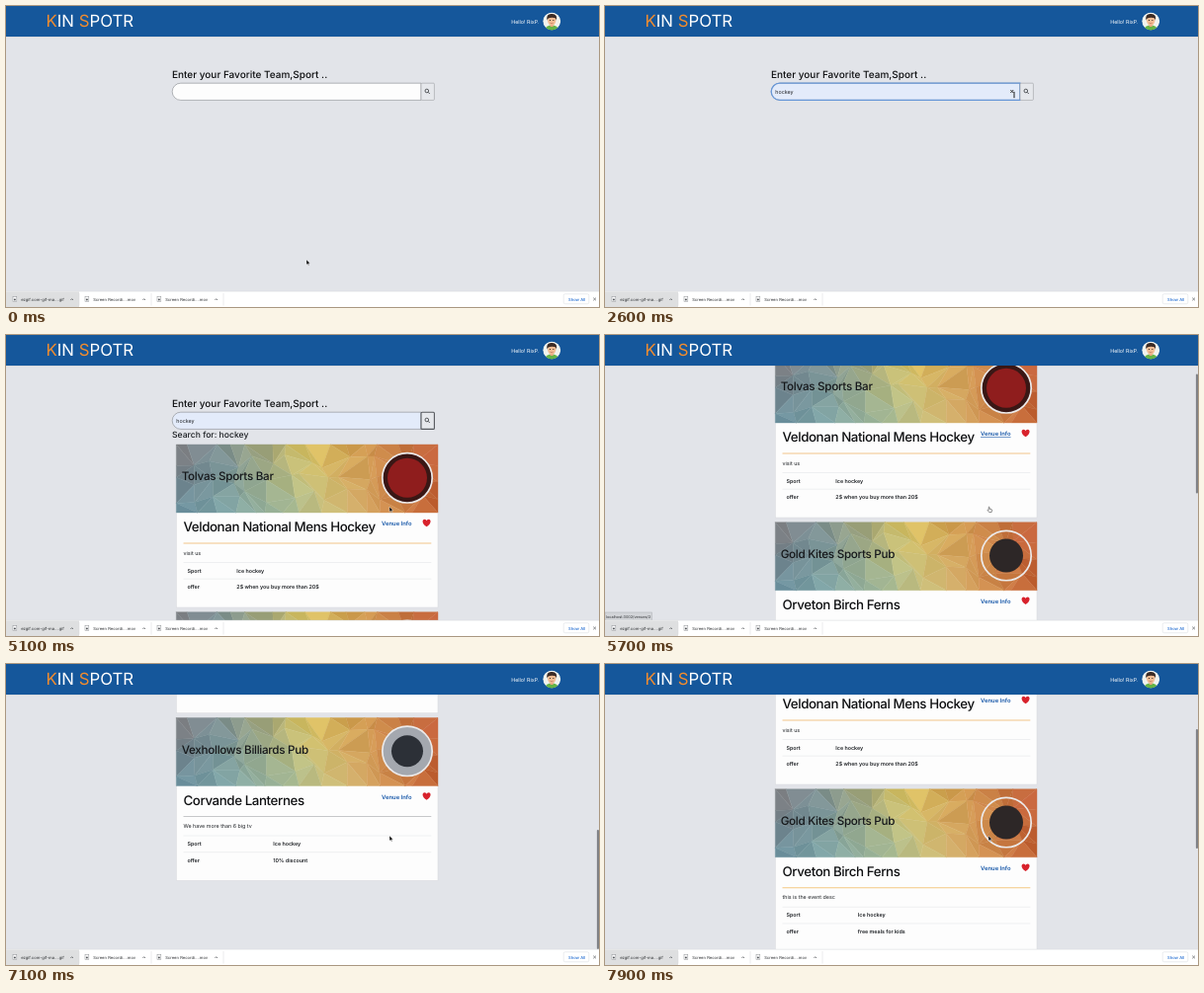
An HTML page that plays this animation: 600x305 px, repeating every 8 s.

```html
<!DOCTYPE html>
<html lang="en">
<head>
<meta charset="utf-8">
<title>Sports venue search</title>
<style>
  html, body { margin: 0; width: 100%; height: 100%; overflow: hidden; background: #e2e4e9; }
  svg { display: block; width: 600px; height: 305px; }
  text { font-family: Inter, "Open Sans", sans-serif; font-size: 5.35px; fill: #1d2024; text-rendering: geometricPrecision; white-space: pre; }
  .brand { font-size: 16.8px; font-weight: 400; fill: #fff; }
  .brand tspan { fill: #f28c2e; }
  .title { font-size: 10px; font-weight: 500; fill: #0e0f11; }
  .venue { font-size: 11.67px; font-weight: 500; letter-spacing: -.025em; fill: #15171a; }
  .event { font-size: 13.33px; font-weight: 500; letter-spacing: -.031em; fill: #0e0f11; }
  .bold { font-weight: 600; }
  .link { font-size: 5.9px; font-weight: 600; fill: #1556a8; }
  .tiny { font-size: 4.15px; fill: #2c2f32; }
</style>
</head>
<body>
<script>
const LOOP = 8000, STEP = 100;
const STAGE_H = 289, PAGE_H = 685;

// Each row: time, then values to blend between.
const SCROLL = [
  [5100, 0], [5300, 18], [5700, 91], [6300, 248], [6800, 385],
  [6950, 396], [7200, 396], [7400, 350], [7900, 154]
];
const POINTER = [
  [0, 304, 257], [200, 304, 255], [600, 318, 170], [900, 326, 100], [1200, 310, 88],
  [1600, 300, 90], [1800, 298, 96], [2000, 280, 103], [2200, 290, 102], [2500, 414, 90],
  [2600, 414, 90], [2900, 427, 87], [3600, 427, 87], [4000, 412, 120], [4400, 388, 174]
];
// Each row: start time, pointer shape.
const SHAPES = [
  [0, 'arrow'], [1000, 'beam'], [1800, 'arrow'], [2400, 'beam'],
  [2700, 'arrow'], [5300, 'hand'], [5800, 'arrow']
];

const CARDS = [
  { venue: 'Tolvas Sports Bar', event: 'Veldonan National Mens Hockey', desc: 'visit us',
    offer: '2$ when you buy more than 20$', col: 61, rule: '#efb56a', back: '#3a1715', mark: '#8f1d1d', size: 20 },
  { venue: 'Gold Kites Sports Pub', event: 'Orveton Birch Ferns', desc: 'this is the event desc',
    offer: 'free meals for kids', col: 83.5, rule: '#f2ba62', back: 'none', mark: '#2d2727', size: 17 },
  { venue: 'Vexhollows Billiards Pub', event: 'Corvande Lanternes', desc: 'We have more than 6 big tv',
    offer: '10% discount', col: 98, rule: '#b9babd', back: '#a4a8af', mark: '#2c3037', size: 16 }
];

function text(x, y, str, cls = '', extra = '') {
  return `<text x="${x}" y="${y}" class="${cls}" ${extra}>${str}</text>`;
}
function rect(x, y, w, h, fill, extra = '') {
  return `<rect x="${x}" y="${y}" width="${w}" height="${h}" fill="${fill}" ${extra}/>`;
}
function line(x1, y1, x2, y2, stroke, w = .5) {
  return `<path d="M${x1} ${y1}L${x2} ${y2}" stroke="${stroke}" stroke-width="${w}"/>`;
}

function blend(keys, t) {
  if (t <= keys[0][0]) return keys[0].slice(1);
  for (let i = 1; i < keys.length; i++) {
    const a = keys[i - 1], b = keys[i];
    if (t <= b[0]) {
      const k = (t - a[0]) / (b[0] - a[0]);
      return a.slice(1).map((v, j) => v + (b[j + 1] - v) * k);
    }
  }
  return keys[keys.length - 1].slice(1);
}

function random(seed) {
  return () => (seed = (seed * 16807) % 2147483647) / 2147483647;
}

// Colour rows: position, red, green, blue.
const TOP = [[0, 126, 118, 120], [.15, 116, 136, 144], [.35, 166, 168, 122], [.5, 220, 194, 94], [.75, 204, 144, 74], [1, 190, 88, 52]];
const LOW = [[0, 102, 140, 156], [.2, 126, 164, 164], [.45, 174, 194, 156], [.58, 202, 190, 122], [.78, 208, 148, 82], [1, 196, 98, 52]];

function banner(w, h) {
  const rnd = random(4217), cols = 14, rows = 4, pts = [];
  for (let r = 0; r <= rows; r++) {
    for (let c = 0; c <= cols; c++) {
      const jx = c % cols ? rnd() - .5 : 0, jy = r % rows ? rnd() - .5 : 0;
      pts.push([(c + jx * .9) * w / cols, (r + jy * .9) * h / rows]);
    }
  }
  const tri = ids => {
    const p = ids.map(i => pts[i]);
    const x = (p[0][0] + p[1][0] + p[2][0]) / 3 / w, y = (p[0][1] + p[1][1] + p[2][1]) / 3 / h;
    const a = blend(TOP, x), b = blend(LOW, x), shade = (rnd() - .5) * 20;
    const rgb = a.map((v, i) => Math.round(v + (b[i] - v) * y + shade));
    const fill = `rgb(${rgb})`;
    return `<path d="M${p.map(q => q.map(v => v.toFixed(1))).join('L')}Z" fill="${fill}" stroke="${fill}" stroke-width=".4"/>`;
  };
  let out = '';
  for (let r = 0; r < rows; r++) {
    for (let c = 0; c < cols; c++) {
      const a = r * (cols + 1) + c, b = a + 1, d = a + cols + 1, e = d + 1;
      out += rnd() < .5 ? tri([a, b, d]) + tri([b, e, d]) : tri([a, b, e]) + tri([a, e, d]);
    }
  }
  return out;
}

function card(c, i) {
  const y = 111 + i * 169.75;
  return `<g transform="translate(172.3 ${y})">
    ${rect(0, 0, 264.7, 165, '#fdfdfd', 'stroke="#d6d8dc" stroke-width=".5"')}
    <use href="#banner"/>
    ${text(5.4, 36.2, c.venue, 'venue')}
    <circle cx="233.7" cy="33.8" r="25.2" fill="${c.back}" stroke="#eceaea" stroke-width="1.7"/>
    <circle cx="233.7" cy="33.8" r="${c.size}" fill="${c.mark}"/>
    ${text(7.2, 88.4, c.event, 'event')}
    ${text(207.7, 82.2, 'Venue Info', 'link', i ? '' : 'id="link"')}
    <path transform="translate(253.3 79.3)" d="M0 4C-5.5 .4-4.4-3.6-2.2-3.6C-.9-3.6-.2-2.8 0-2.1C.2-2.8 .9-3.6 2.2-3.6C4.4-3.6 5.5 .4 0 4Z" fill="#d8222c"/>
    ${line(7.2, 100, 258, 100, c.rule, .8)}
    ${text(7.2, 111.6, c.desc)}
    ${line(7.2, 119.5, 258, 119.5, '#dfe1e4')}
    ${text(11.2, 129.5, 'Sport', 'bold')}${text(c.col, 129.5, 'Ice hockey', 'bold')}
    ${line(7.2, 136.2, 258, 136.2, '#dfe1e4')}
    ${text(11.2, 146.1, 'offer', 'bold')}${text(c.col, 146.1, c.offer, 'bold')}
  </g>`;
}

const FIELD = 'M176.8 78.2H420V95.4H176.8A8.6 8.6 0 0 1 176.8 78.2Z';

function searchForm() {
  return text(168, 72.8, 'Enter your Favorite Team,Sport ..', 'title') +
    `<path id="field" d="${FIELD}" stroke="#85888d" stroke-width=".6"/>
    <path id="ring" d="${FIELD}" fill="none" stroke="#6797d8" stroke-width="1.3"/>` +
    text(172.3, 88.6, 'hockey', '', 'id="value"') +
    `<path id="clear" d="M410.3 85L413.3 88M413.3 85L410.3 88" stroke="#222" stroke-width=".9"/>
    ${rect(420, 78.2, 13.4, 17.2, '#e6e8ec', 'id="button" rx="1"')}
    <g fill="none" stroke="#33363a" stroke-width=".8"><circle cx="425.8" cy="86" r="1.8"/><path d="M427.1 87.3L428.8 89"/></g>`;
}

function menu() {
  const rows = ['hockey', 'soccer', 'tennis', 'basketball'];
  return `<g id="menu">${rect(169, 97, 251, 72, '#fff', 'rx="2" stroke="#c9ccd1" stroke-width=".5"')}
    ${rect(169, 99, 251, 16, '#e9eaed', 'id="pick"')}
    ${rows.map((r, i) => text(174, 109 + i * 17, r)).join('')}</g>`;
}

function header() {
  return rect(0, 31, 600, 1, '#000', 'opacity=".05"') + rect(0, 0, 600, 31, '#15579b') +
    text(40.5, 21.2, '<tspan>K</tspan>IN <tspan>S</tspan>POTR', 'brand') +
    text(511.2, 17.6, 'Hello! RixP.', '', 'style="fill:#fff"') +
    `<g clip-path="url(#round)"><circle cx="552.2" cy="15.4" r="9" fill="#f1f3ee"/>
      <ellipse cx="552.2" cy="24" rx="6.8" ry="4.6" fill="#64b445"/>
      ${rect(550.7, 17, 3, 4, '#e5a77c')}
      <ellipse cx="552.2" cy="14.6" rx="4.2" ry="5" fill="#f2bd94"/>
      <path d="M547.4 14.5C546.4 7.6 551 8 552.6 8C557.4 8 557.6 12 556.9 14.5C556.5 12.4 555.3 11.7 552.3 11.8C549 11.8 548 12.6 547.4 14.5Z" fill="#3b2b25"/>
      <circle cx="550.5" cy="14.6" r=".5"/><circle cx="553.9" cy="14.6" r=".5"/>
      <path d="M550.7 17.2Q552.2 18.4 553.7 17.2" fill="none" stroke="#a2503f" stroke-width=".5"/></g>`;
}

function download(x, name) {
  return `${rect(x + 7, 294.6, 3.8, 5, '#fff', 'stroke="#8d9094" stroke-width=".5"')}
    <circle cx="${x + 8.9}" cy="297.4" r="1" fill="#55585c"/>
    ${text(x + 15.2, 298.9, name, 'tiny')}
    <path d="M${x + 65.4} 298L${x + 66.7} 296.7L${x + 68} 298" fill="none" stroke="#45484c" stroke-width=".7"/>
    ${line(x + 74, 291, x + 74, 303.5, '#d5d7da')}`;
}

function shelf() {
  return rect(0, 289, 600, 16, '#fff') + line(0, 289.2, 600, 289.2, '#d2d4d8') +
    rect(0, 289.4, 74, 15.6, '#dedfe0') +
    download(0, 'ezgif.com-gif-ma....gif') +
    download(73, 'Screen Recordi....mov') + download(146, 'Screen Recordi....mov') +
    rect(564.2, 291.8, 25.6, 10, '#fff', 'rx="1.5" stroke="#d5d8dc" stroke-width=".5"') +
    text(569, 298.6, 'Show All', 'tiny', 'style="fill:#1f6bd0;font-weight:500"') +
    '<path d="M594.2 295.6L597 298.4M597 295.6L594.2 298.4" stroke="#45484c" stroke-width=".6"/>';
}

function pointers() {
  return `<g id="pointer" stroke-linejoin="round">
    <path id="arrow" d="M0 0V5.2L1.2 4.1L2 5.8L2.9 5.4L2.1 3.8H3.7Z" fill="#000" stroke="#fff" stroke-width=".4"/>
    <path id="beam" d="M-.9-2.8Q0-2.8 0-2V2Q0 2.8-.9 2.8M.9-2.8Q0-2.8 0-2V2Q0 2.8 .9 2.8" fill="none" stroke="#222" stroke-width=".6"/>
    <path id="hand" d="M.2 .4Q.7-.2 1.1 .5V2.2L3 2.6Q3.7 2.8 3.6 3.6L3.1 5.6H.7L-.9 3.5Q-.7 2.8 .2 3.4Z" fill="#fff" stroke="#222" stroke-width=".5"/>
  </g>`;
}

document.body.innerHTML = `<svg viewBox="0 0 600 305">
  <defs><g id="banner">${banner(264.7, 69)}</g>
    <clipPath id="round"><circle cx="552.2" cy="15.4" r="9"/></clipPath></defs>
  ${rect(0, 0, 600, 305, '#e2e4e9')}
  <g id="page">${searchForm()}
    <g id="results">${text(168, 104.4, 'Search for: hockey', '', 'style="font-size:8.6px;font-weight:500"')}
      ${CARDS.map(card).join('')}</g>
    ${menu()}</g>
  ${header()}
  ${rect(597.9, 0, 2.1, 121, '#808287', 'id="thumb" rx="1"')}
  <g id="status">${rect(0, 281, 47.5, 8.2, '#d3d5d9', 'stroke="#a9acb1" stroke-width=".5"')}
    ${text(1, 286.5, 'localhost:3002/venues/2', 'tiny', 'style="font-size:3.85px"')}</g>
  ${shelf()}
  ${pointers()}
</svg>`;

const el = id => document.getElementById(id);
const show = (id, on) => { el(id).style.display = on ? '' : 'none'; };
const during = (t, from, to) => t >= from && t < to;

function render(t) {
  const [scroll] = blend(SCROLL, t);
  const [x, y] = blend(POINTER, t);
  const shape = SHAPES.filter(s => s[0] <= t).pop()[1];
  const filled = t >= 2000, pressed = t >= 2900;

  el('page').setAttribute('transform', `translate(0 ${-scroll})`);
  el('field').setAttribute('fill', filled ? '#e3ebfa' : '#fdfdfd');
  el('button').setAttribute('stroke', pressed ? '#55585d' : '#9a9da2');
  el('button').setAttribute('stroke-width', pressed ? 1.1 : .6);
  show('ring', during(t, 1200, 2900));
  show('value', filled);
  show('clear', during(t, 2200, 2900));
  show('menu', during(t, 1300, 2200));
  show('pick', during(t, 1900, 2200));
  show('results', t >= 3000);

  el('link').setAttribute('text-decoration', during(t, 5300, 5800) ? 'underline' : 'none');
  show('status', during(t, 5300, 6500));
  show('thumb', t >= 5300);
  el('thumb').setAttribute('y', 1 + scroll * STAGE_H / PAGE_H);

  el('pointer').setAttribute('transform', `translate(${x} ${y})`);
  for (const id of ['arrow', 'beam', 'hand']) show(id, id === shape);
}

const start = performance.now();
function tick() {
  const t = (performance.now() - start) % LOOP;
  render(Math.floor(t / STEP) * STEP);
  requestAnimationFrame(tick);
}
tick();
</script>
</body>
</html>
```
